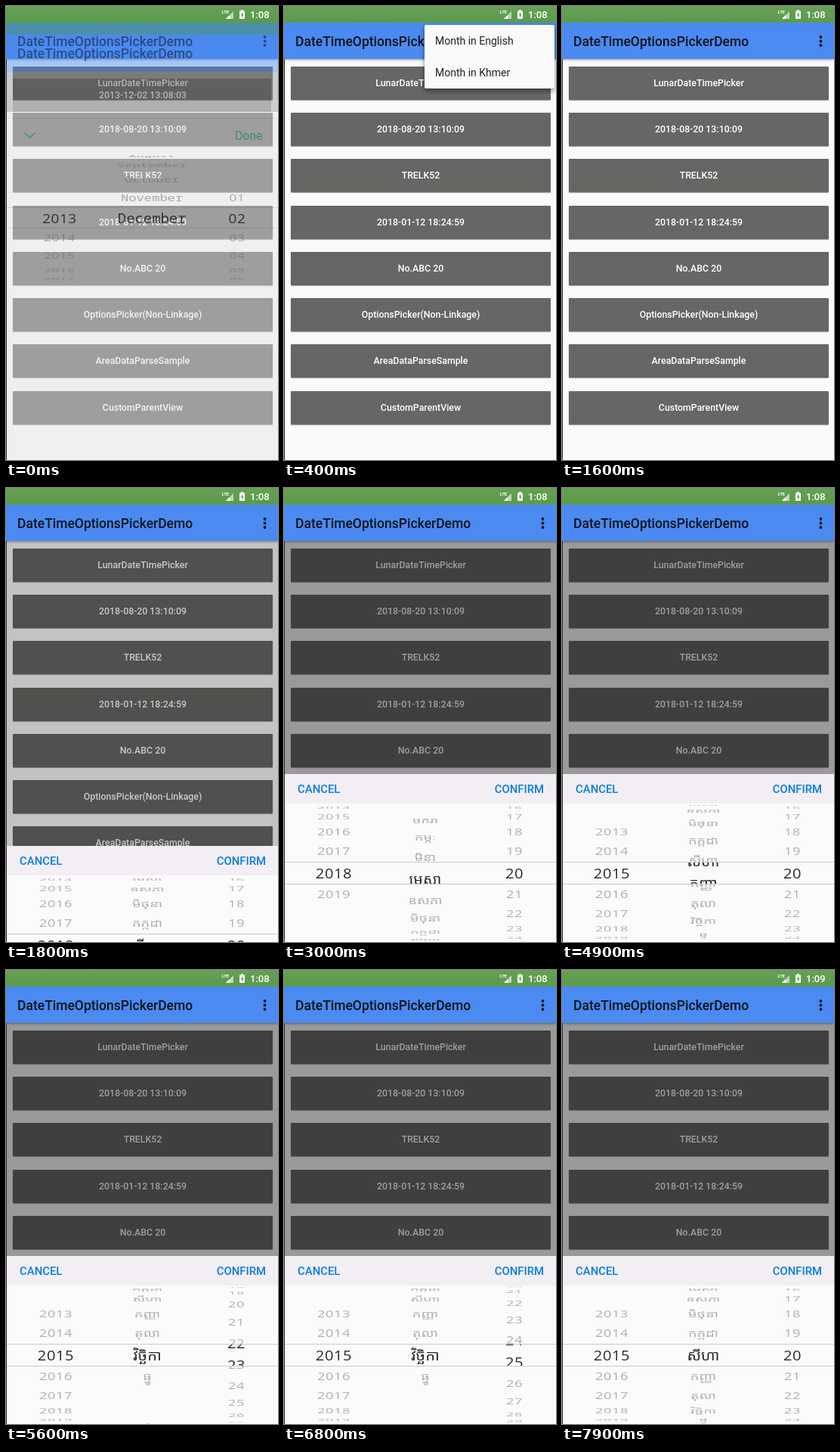
Write an HTML page that moves like this. It is 360x600 px and loops after 8000 ms.

```html
<!DOCTYPE html>
<html lang="en">
<head>
<meta charset="utf-8">
<title>Options picker demo</title>
<style>
  html, body { margin: 0; width: 100%; height: 100%; overflow: hidden; }
  body { background: #fafafa; font: 500 12.35px Roboto, sans-serif; }
  div, span, svg { position: absolute; white-space: nowrap; }
  #stage { left: 0; top: 0; width: 360px; height: 600px; overflow: hidden; background: #fafafa; }
  #status { width: 360px; height: 22px; background: linear-gradient(#679f55, #5b9a4c); color: #fff; }
  #status span { left: 323px; top: 4px; font-size: 13px; line-height: 16px; }
  #bar { top: 22px; width: 360px; height: 48px; background: #4b8af0; box-shadow: 0 1px 3px #0006; }
  .title { left: 15px; font-size: 17.5px; line-height: 24px; color: #10141c; }
  .button {
    left: 9px; width: 344px; height: 44px; line-height: 44px; text-align: center;
    background: #666664; color: #fff; border-radius: 1px; box-shadow: 0 1px 1px #0006;
  }
  #edge { left: 0; top: 70px; width: 1px; height: 530px; background: #2c2c2c; }

  /* Anything timed runs on one 8 s loop in held steps of 100 ms. */
  .timed { animation: 8s step-end infinite; }
  #early { animation-name: early; }
  #late { animation-name: late; }
  @keyframes early { 0% { opacity: 1 } 93.75%, 100% { opacity: 0 } }
  @keyframes late { 0% { opacity: 0 } 93.75%, 100% { opacity: 1 } }

  #menu {
    left: 186px; top: 25px; width: 172px; height: 84px;
    background: #fafafa; border-radius: 2px; box-shadow: 0 3px 7px #0007;
    color: #222; font-size: 14px; font-weight: 400; line-height: 42px;
    transform-origin: 100% 0; animation-name: pop;
  }
  #menu span { left: 14px; }
  #press { top: 42px; width: 172px; height: 42px; background: #000; animation-name: press; }
  @keyframes pop {
    0% { opacity: 0; transform: none }
    3.75% { opacity: .65; transform: scale(.85, .7) }
    5% { opacity: 1; transform: none }
    17.5% { opacity: .6; transform: none }
    18.75% { opacity: .2; transform: none }
    20%, 100% { opacity: 0; transform: none }
  }
  @keyframes press {
    0% { opacity: 0 } 13.75% { opacity: .05 } 15%, 100% { opacity: .1 }
  }

  #dim { top: 70px; width: 360px; height: 530px; background: #000; animation-name: dim; }
  @keyframes dim { 0% { opacity: 0 } 22.5% { opacity: .22 } 23.75%, 100% { opacity: .385 } }
  #sheet { top: 378px; width: 360px; height: 222px; background: #fbfbfb; animation-name: rise; }
  @keyframes rise {
    0% { transform: translateY(230px) }
    22.5% { transform: translateY(95px) }
    23.75%, 100% { transform: none }
  }
  #head { width: 360px; height: 39px; background: #f3eef3; color: #0a7de2; font-size: 14.9px; line-height: 40px; }

  .wheels {
    width: 360px; height: 183px; overflow: hidden; color: #aeaeae;
    font: 400 18.3px/28px "Noto Sans Mono", "Noto Sans Khmer", "Noto Sans", monospace;
  }
  .band {
    top: 77px; width: 360px; height: 28px; overflow: hidden; color: #2a2a2a;
    background: #fbfbfb; border: solid #c8cccc; border-width: 1px 0;
  }
  .wheels span { top: 0; }
  .wheels .digits { font-family: "Open Sans", "Noto Sans", sans-serif; letter-spacing: .03em; }

  #ghost { width: 360px; height: 600px; animation-name: leave; }
  #ghost .wheels { top: 188px; transform: scale(.94); overflow: visible; color: #6668; }
  #ghost .band { background: none; border-color: #0002; left: -20px; padding: 0 20px; color: #222d; }
  #ghost .band span { margin-left: 20px; }
  @keyframes leave {
    0% { opacity: 1; transform: none }
    1.25% { opacity: .4; transform: translateY(14px) }
    2.5%, 100% { opacity: 0; transform: none }
  }
  .veil { left: 0; width: 360px; }
</style>
</head>
<body>
<div id="stage">
  <div id="buttons"></div>
  <div id="bar">
    <span class="title" style="top:13px">DateTimeOptionsPickerDemo</span>
    <svg style="left:338px;top:16px" width="9" height="18" fill="#10141c">
      <circle cx="4.5" cy="3" r="1.9"/><circle cx="4.5" cy="8.5" r="1.9"/><circle cx="4.5" cy="14" r="1.9"/>
    </svg>
  </div>

  <div id="ghost" class="timed">
    <div class="veil" style="top:22px;height:16px;background:#4f965573"></div>
    <div class="veil" style="top:38px;height:49px;background:#4b8af078"></div>
    <div class="veil" style="top:87px;height:9px;background:#96969673"></div>
    <div class="veil" style="top:96px;height:44px;width:342px;border:solid #96969673;border-width:0 9px;background:#58585873 padding-box"></div>
    <div class="veil" style="top:140px;height:460px;background:#e3e3e373;box-shadow:inset 0 1px #fff9"></div>
    <span class="title" style="top:51px;opacity:.5">DateTimeOptionsPickerDemo</span>
    <div style="left:9px;width:344px;top:96px;line-height:44px;text-align:center;color:#b4b4b4">2013-12-02 13:08:03</div>
    <div class="veil" style="top:148px;height:1px;background:#0001"></div>
    <svg style="left:23px;top:165px" width="17" height="12" fill="none" stroke="#3d8f80" stroke-width="1.4">
      <path d="M1.5 2.5 8.5 9l7-6.5"/>
    </svg>
    <span style="left:303px;top:162px;font-size:15.8px;font-weight:400;line-height:20px;color:#3d8f80">Done</span>
    <div class="wheels" id="oldWheels"><div class="band"></div></div>
  </div>

  <div id="status">
    <svg style="left:285px;top:0" width="36" height="22" fill="#fff">
      <text x="0.5" y="10" font-size="6" font-family="Roboto, sans-serif" font-weight="700">LTE</text>
      <path d="M16 7v10H6l4-4h2v-2z" opacity=".6"/><path d="M11.5 11.5V17H6z"/>
      <path d="M26 5h3v1.5h2V17h-7V6.5h2z"/><path d="M28.2 8 25.6 12.2h1.6V15.5l2.5-4.3h-1.5z" fill="#5f9c50"/>
    </svg>
    <span id="early" class="timed">1:08</span><span id="late" class="timed">1:09</span>
  </div>

  <div id="menu" class="timed">
    <div id="press" class="timed"></div>
    <span>Month in English</span><span style="top:42px">Month in Khmer</span>
  </div>

  <div id="dim" class="timed"></div>
  <div id="sheet" class="timed">
    <div id="head"><span style="left:18px">CANCEL</span><span style="right:16px">CONFIRM</span></div>
    <div class="wheels" id="wheels" style="top:39px"><div class="band"></div></div>
  </div>
  <div id="edge"></div>
</div>

<script>
const RADIUS = 90, STEP = 18.4 * Math.PI / 180, LOOP = 8000;
const $ = id => document.getElementById(id);
const range = (from, to) => Array.from({ length: to - from + 1 }, (_, i) => String(from + i).padStart(2, '0'));

['LunarDateTimePicker', '2018-08-20 13:10:09', 'TRELK52', '2018-01-12 18:24:59', 'No.ABC 20',
  'OptionsPicker(Non-Linkage)', 'AreaDataParseSample', 'CustomParentView'].forEach((label, i) => {
  const button = document.createElement('div');
  button.className = 'button';
  button.textContent = label;
  button.style.top = Math.floor(80.3 + i * 61.25) + 'px';
  $('buttons').append(button);
});

function addText(parent, x, text) {
  const span = document.createElement('span');
  span.textContent = text;
  span.style.left = x + 'px';
  span.classList.toggle('digits', /^\d+$/.test(text));
  parent.append(span);
  return span;
}

// Returns a function that turns the wheel to a (fractional) value.
function makeWheel(host, x, labels, first) {
  const band = host.querySelector('.band');
  const items = labels.map(text => {
    const outer = addText(host, x, text);
    host.insertBefore(outer, band);
    return { outer, inner: addText(band, x, text) };
  });
  return value => items.forEach(({ outer, inner }, i) => {
    const d = i + first - value, angle = d * STEP;
    const y = RADIUS * Math.sin(angle), squash = Math.cos(angle);
    const pose = (mid, sx, sy) => `translate(-50%, ${mid - 14 + y}px) scale(${sx}, ${sy})`;
    const shown = Math.abs(d) < 4.8;
    outer.style.visibility = shown && Math.abs(d) > .1 ? 'visible' : 'hidden';
    inner.style.visibility = Math.abs(d) < 1.2 ? 'visible' : 'hidden';
    outer.style.transform = pose(91.5, 1, .8 * squash);
    inner.style.transform = pose(14, 1.1, squash);
  });
}

const khmer = 'មករា កម្ភៈ មិនា មេសា ឧសភា មិថុនា កក្កដា សីហា កញ្ញា តុលា វិច្ឆិកា ធ្នូ'.split(' ');
const english = ['August', 'September', 'October', 'November', 'December'];

const old = $('oldWheels');
makeWheel(old, 64, range(2013, 2019), 2013)(2013);
makeWheel(old, 194, english, 8)(12);
makeWheel(old, 314, range(1, 31), 1)(2);

// Each move: start, end, target value, ease-out power.
const wheels = [
  { turn: makeWheel($('wheels'), 66, range(2013, 2019), 2013), from: 2018, moves: [[3700, 4300, 2015, 1.7]] },
  { turn: makeWheel($('wheels'), 187, khmer, 1), from: 8,
    moves: [[2500, 3400, 2, 1.54], [4400, 5300, 11, 1.6], [7700, 7900, 8, 1]] },
  { turn: makeWheel($('wheels'), 305, range(1, 30), 1), from: 20, moves: [[5500, 6100, 27, 2.5], [6700, 7200, 20, 1.8]] }
];

function valueAt(t, { from, moves }) {
  for (const [start, end, to, power] of moves) {
    if (t <= start) break;
    const left = 1 - Math.min(1, (t - start) / (end - start));
    from = to + (from - to) * left ** power;
  }
  return from;
}

let begin;
function draw(now) {
  begin ??= now;
  const t = Math.floor((now - begin) % LOOP / 100) * 100;
  wheels.forEach(wheel => wheel.turn(valueAt(t, wheel)));
  requestAnimationFrame(draw);
}
requestAnimationFrame(draw);
</script>
</body>
</html>
```
